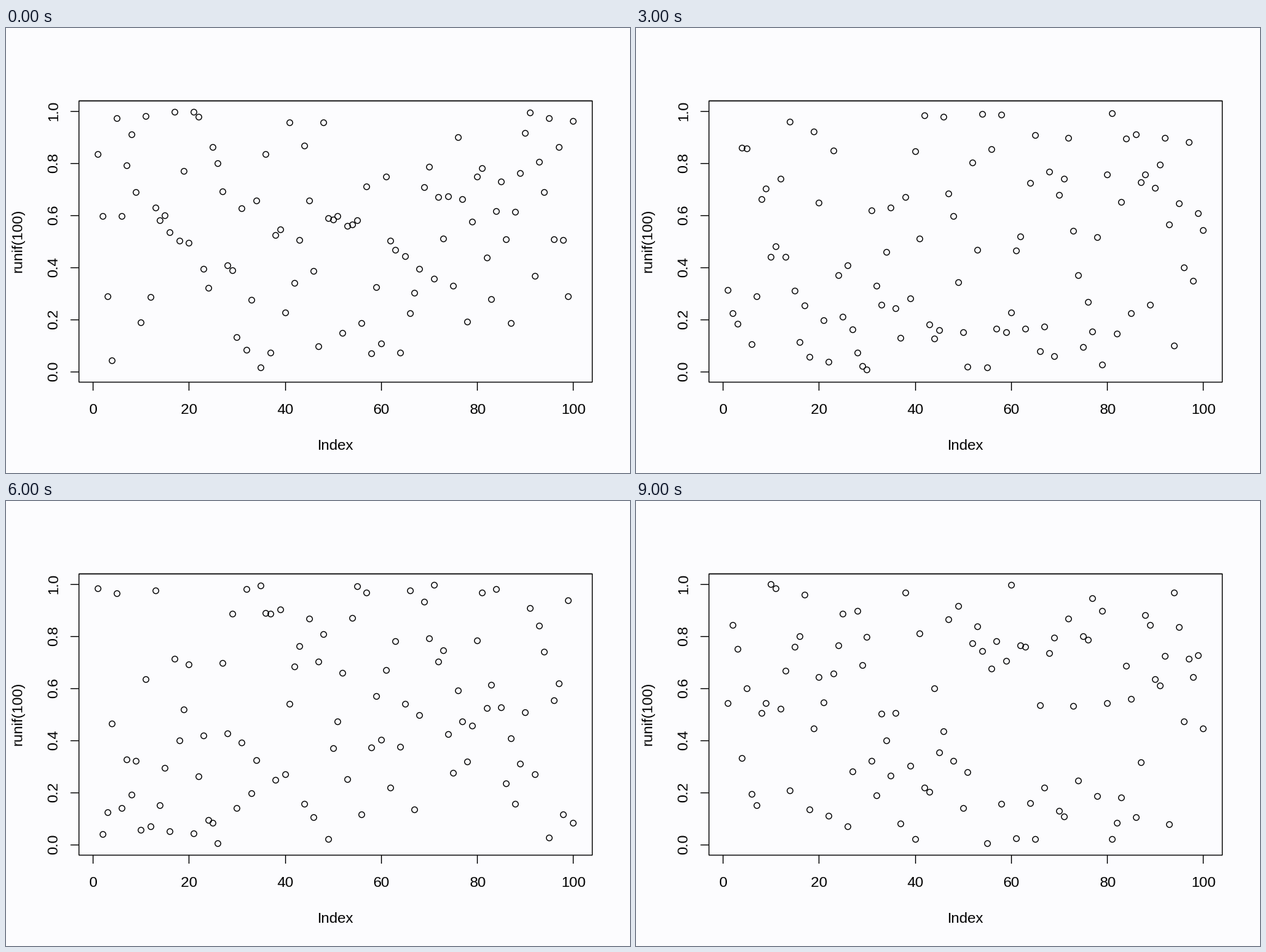
Animation, 885 px wide and 632 px high, one loop 10000 ms. Source, as a matplotlib script:

```python
import numpy as np
import matplotlib.pyplot as plt
from matplotlib.animation import FuncAnimation

W, H, DPI = 885, 632, 100
PT = 72 / DPI
PAPER, INK = "#fcfcfe", "black"
LEFT, RIGHT, TOP, BOTTOM = 103.5, 831.5, 103.5, 503
TICK = 12
STROKE = 1.3 * PT
DRAWS, N = 10, 100


def px(index):
    return np.floor(123.6 + 6.81 * np.asarray(index)) + 0.5


def py(value):
    return np.floor(488.3 - 370 * np.asarray(value)) + 0.5


def line(xs, ys):
    ax.plot(xs, ys, color=INK, lw=STROKE, snap=False,
            solid_capstyle="butt", solid_joinstyle="miter")


def label(x, y, text, rotation=0):
    ax.text(x, y, text, family="Liberation Sans", size=21 * PT, color=INK,
            ha="center", va="baseline", rotation=rotation,
            rotation_mode="anchor")


def sample(i):
    """Uniform random values for draw i, one circle per index."""
    values = np.random.default_rng(100 + i).random(N)
    return np.column_stack([px(np.arange(1, N + 1)), py(values)])


fig = plt.figure(figsize=(W / DPI, H / DPI), dpi=DPI, facecolor=PAPER)
ax = fig.add_axes([0, 0, 1, 1])
ax.axis("off")

line([LEFT, RIGHT, RIGHT, LEFT, LEFT, RIGHT],
     [TOP, TOP, BOTTOM, BOTTOM, TOP, TOP])
for tick in range(0, 101, 20):
    x, y = px(tick), py(tick / 100)
    line([x, x], [BOTTOM, BOTTOM + TICK])
    line([LEFT - TICK, LEFT], [y, y])
    label(x, 548.5, str(tick))
    label(73.5, y - 1, f"{tick / 100:.1f}", 90)
label(467, 599, "Index")
label(23, 302, "runif(100)", 90)

points = ax.scatter(*sample(0).T, s=(8.2 * PT) ** 2, facecolors="none",
                    edgecolors=INK, linewidths=STROKE)
ax.set_xlim(0, W)
ax.set_ylim(H, 0)


def update(i):
    points.set_offsets(sample(i))
    return points,


anim = FuncAnimation(fig, update, frames=DRAWS, interval=1000, repeat=True,
                     repeat_delay=0)
plt.show()
```
